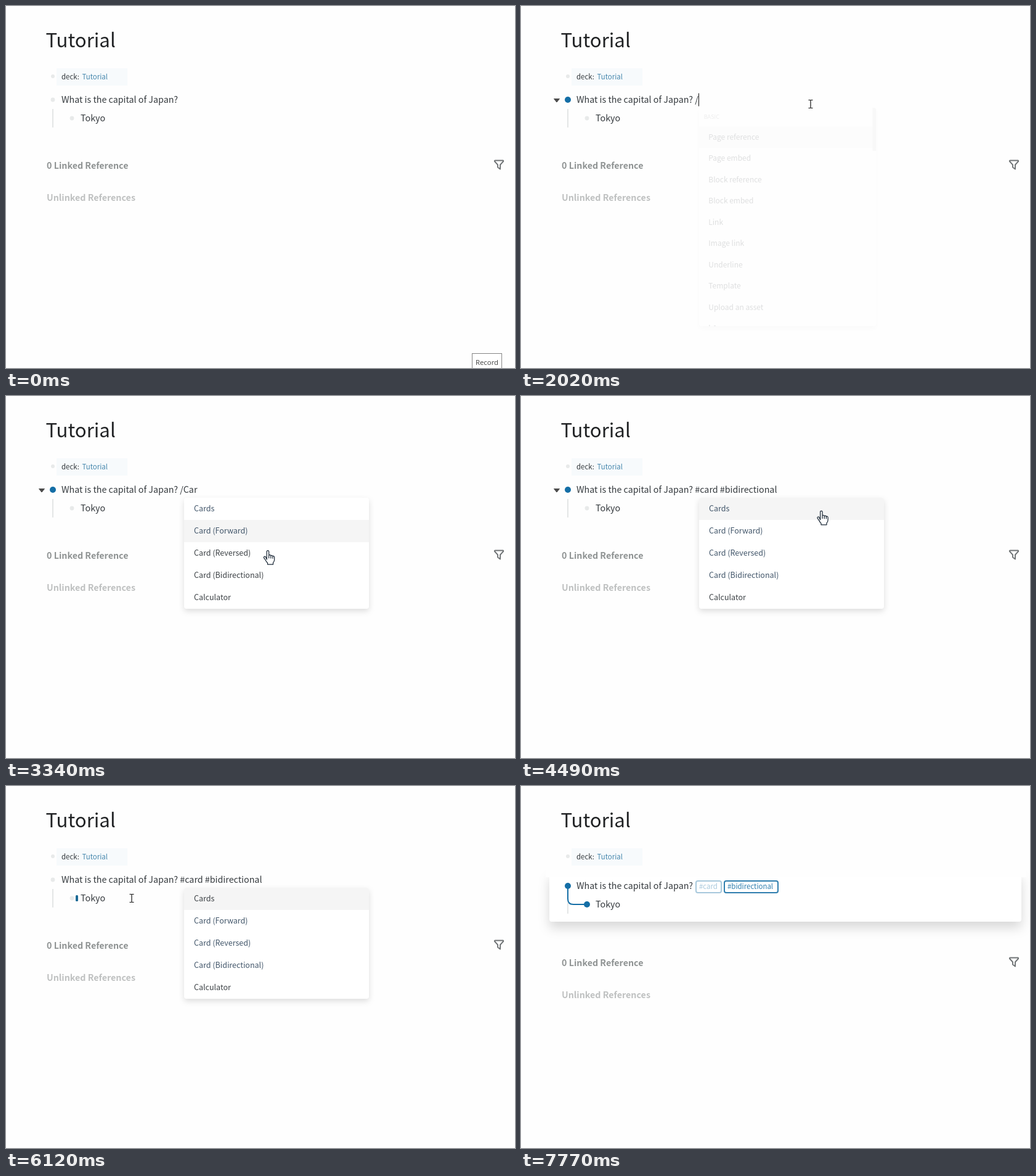
An HTML page that plays this animation: 826 px wide and 587 px high, repeating every 8 s.

```html
<!DOCTYPE html>
<html lang="en">
<head>
<meta charset="utf-8">
<title>Tutorial</title>
<style>
html, body { margin: 0; width: 100%; height: 100%; overflow: hidden; background: #fefefe; }
svg { display: block; width: 826px; height: 587px; }
text { font-family: "Noto Sans CJK JP", "Noto Sans CJK SC", "Open Sans", sans-serif; font-size: 14.29px; fill: #353a3e; white-space: pre; }
.title { font-size: 31.2px; font-weight: 300; fill: #202224; }
.small { font-size: 11.43px; }
.item { font-size: 12.5px; fill: #3c4145; }
.seen { fill: #42566a; }
.head { font-size: 9.5px; fill: #999; }
.ref { font-weight: 700; }
.tag { font-size: 11.43px; font-weight: 500; }
.tip { font: 11.4px "Open Sans", sans-serif; fill: #444; }
.menu { filter: drop-shadow(0 4px 5px rgba(0, 0, 0, .13)); }
.panel { filter: drop-shadow(0 10px 9px rgba(0, 0, 0, .15)); }
</style>
</head>
<body>
<svg viewBox="0 0 826 587">
  <defs><clipPath id="clip"><rect width="300" height="370" rx="4"/></clipPath></defs>
  <text class="title" x="64.5" y="66.5">Tutorial</text>
  <circle cx="76" cy="114" r="3" fill="#e8eaea"/>
  <rect x="82" y="101" width="115" height="28" fill="#f7fafc"/>
  <text class="small" x="90" y="119">deck:</text>
  <text class="small" x="123.5" y="119" style="fill:#4587ad">Tutorial</text>

  <rect id="panel" class="panel" x="46" y="140" width="766" height="80" rx="4" fill="#fff"/>
  <rect id="cover" x="40" y="132" width="780" height="16" fill="#fefefe"/>
  <g id="block">
    <path id="guide" d="M76 167V197" stroke="#e4e6e6" stroke-width="2"/>
    <circle id="dot" cx="76" cy="152"/>
    <circle id="subDot" cx="107" cy="182"/>
    <path id="link" d="M76 152V173Q76 182 85 182H107" fill="none" stroke="#146ea6" stroke-width="2"/>
    <rect id="bar" x="113" y="177" width="4" height="10" rx="1.5" fill="#1c6a95"/>
    <path id="fold" d="M53.5 150.5H62.5L58 156Z" fill="#4a4a4a" stroke="#4a4a4a" stroke-linejoin="round"/>
    <text id="line" x="90" y="157.3"></text>
    <text x="121" y="187.3">Tokyo</text>
    <g id="tags">
      <g opacity=".42">
        <rect x="284" y="144" width="41" height="19" rx="3" fill="none" stroke="#2f7eae" stroke-width="2"/>
        <text class="tag" x="289" y="157" style="fill:#2f7eae">#card</text>
      </g>
      <rect x="330" y="144" width="87" height="19" rx="3" fill="none" stroke="#2f7eae" stroke-width="2"/>
      <text class="tag" x="335" y="157" style="fill:#2f7eae">#bidirectional</text>
    </g>
    <rect id="caret" width="1" height="21" fill="#111"/>
  </g>

  <g id="refs">
    <text class="ref" x="66" y="264" style="fill:#8f9393">0 Linked Reference</text>
    <text class="ref" x="66" y="316" style="fill:#bfc1c1">Unlinked References</text>
    <path transform="translate(788 245.5)" d="M5.5 5h13a1 1 0 0 1 .5 1.5L14 12v7l-4-3v-4L5 6.5A1 1 0 0 1 5.5 5" fill="none" stroke="#707476" stroke-width="1.9" stroke-linejoin="round"/>
  </g>

  <g id="menu"></g>

  <g id="tip">
    <rect x="756.5" y="563.5" width="48" height="30" fill="#fff" stroke="#858585"/>
    <text class="tip" x="780.5" y="582" text-anchor="middle">Record</text>
  </g>

  <path id="arrow" d="M0 0V16.5L3.8 13L6.3 18.7L8.8 17.6L6.4 12H11.5Z" fill="#fff" stroke="#111"/>
  <path id="beam" d="M-3.5 -6.5H-1L0 -6L1 -6.5H3.5M0 -6V6M-3.5 6.5H-1L0 6L1 6.5H3.5" fill="none" stroke="#111" stroke-width="1.2"/>
  <path id="hand" d="M-1.7 14V1.3Q-1.7 -.5 0 -.5T1.7 1.3V8Q1.9 6.4 3.4 6.6T4.9 8.4Q5.3 7.1 6.6 7.4T8 9.2Q8.3 8.2 9.4 8.4T10.7 10.2V14.5Q10.7 17.4 8.6 19.2V22H-.4V19.6Q-2.4 17.8 -4 14.6L-6.4 11.2Q-6.8 9.6 -5.5 9.2T-3.4 10.2ZM1.7 8V12.2M4.9 8.4V12.4M8 9.2V12.6" fill="#fff" stroke="#1d2a38" stroke-width="1.25" stroke-linejoin="round"/>
</svg>
<script>
const LOOP = 8000;
const el = {};
document.querySelectorAll("[id]").forEach(e => el[e.id] = e);
const show = (e, on) => e.style.display = on ? "" : "none";
const clamp = v => Math.max(0, Math.min(1, v));

const ask = "What is the capital of Japan?";
// time, text after the question, caret x
const typing = [
  [0, "", 282], [1950, " /", 288], [2330, " /C", 297], [2460, " /Ca", 305],
  [2650, " /Car", 311], [3940, " #card #bidirectional", 417], [6240, "", 161]
];
// spans in which the caret is lit
const lit = [[1090, 1620], [1950, 3180], [3680, 3750], [3940, 4470], [6240, 6730], [7240, 7770]];

const all = ["Page reference", "Page embed", "Block reference", "Block embed", "Link",
  "Image link", "Underline", "Template", "Upload an asset", "h1"];
const ca = ["Cards", "CANCELED", "Calculator", "Card (Forward)", "Card (Reversed)", "Card (Bidirectional)"];
const car = ["Cards", "Card (Forward)", "Card (Reversed)", "Card (Bidirectional)", "Calculator"];
const menus = [[1950, all, 32, 370], [2400, ca, 0, 216], [2790, car, 0, 180]];
// time, highlighted row, first and last row already passed
const hover = [[0, 0, -1, -1], [3200, 0, 0, 0], [3300, 1, 0, 1], [3400, 2, 0, 2], [3500, 3, 0, 3],
  [4290, 2, 0, 3], [4350, 1, 0, 3], [4420, 0, 0, 3], [4980, 0, 1, 3]];

// time, x, y, pointer
const path = [
  [70, 744, 584, "arrow"], [330, 610, 370, "arrow"], [600, 472, 136, "beam"], [830, 470, 127, "beam"],
  [880, 470, 127, "beam"], [1040, 470, 159, "beam"], [2790, 470, 159, "beam"], [2900, 466, 172, "hand"],
  [3200, 442, 220, "hand"], [3340, 425, 251, "hand"], [3540, 403, 273, "hand"], [3750, 399, 276, "hand"],
  [4210, 399, 276, "hand"], [4490, 487, 187, "hand"], [4600, 530, 162, "beam"], [4850, 632, 125, "beam"],
  [4980, 632, 125, "beam"], [5100, 638, 145, "beam"], [5300, 638, 145, "beam"], [5500, 540, 168, "hand"],
  [5650, 390, 190, "hand"], [5760, 282, 196, "beam"], [5950, 212, 184, "beam"], [6030, 204, 182, "beam"], [6240, 204, 182, ""]
];

const at = (table, t) => table.filter(r => r[0] <= t).pop();

function menuMarkup(t) {
  const [, rows, top, height] = at(menus, t);
  const [, active, first, last] = at(hover, t);
  const item = (s, i) => {
    const seen = rows === car && i >= first && i <= last;
    return `<text class="item${seen ? " seen" : ""}" x="16" y="${top + i * 36 + 22}">${s}</text>`;
  };
  return `<rect class="menu" width="300" height="${height}" rx="4" fill="#fff"/><g clip-path="url(#clip)">` +
    `<rect y="${top + active * 36}" width="300" height="36" fill="#f5f5f5"/>` +
    (top ? `<text class="head" x="8" y="19">BASIC</text><rect x="294" width="6" height="73" fill="#ddd"/>` : "") +
    rows.map(item).join("") + "</g>";
}

function dot(e, on) {
  e.setAttribute("r", on ? 5 : 3.4);
  e.setAttribute("fill", on ? "#146ea6" : "#e8eaea");
}

let lastMenu = "";
function draw(t) {
  const done = t >= 6240;
  const editing = t >= 1090 && t < 4980;
  const fade = clamp((t - 6200) / 300);
  show(el.tip, t < 200);

  show(el.panel, done);
  show(el.cover, done);
  el.panel.style.opacity = fade;
  el.block.setAttribute("transform", `translate(0 ${done ? 10 : 0})`);
  el.refs.setAttribute("transform", `translate(0 ${done ? 28 : 0})`);
  dot(el.dot, editing || done);
  dot(el.subDot, done);
  show(el.link, done);
  show(el.tags, done);
  show(el.bar, t >= 5960 && !done);
  show(el.fold, t >= 600 && t < 5040 || t >= 5300 && t < 5700);

  const [, typed, x] = at(typing, t);
  el.line.textContent = ask + typed;
  el.caret.setAttribute("x", x);
  el.caret.setAttribute("y", done ? 171.5 : 141.5);
  show(el.caret, lit.some(([a, b]) => t >= a && t < b));

  const open = t >= 1950 && !done;
  show(el.menu, open);
  if (open) {
    const k = clamp((t - 1990) / 200);
    const html = menuMarkup(t);
    if (html !== lastMenu) el.menu.innerHTML = lastMenu = html;
    el.menu.style.opacity = k;
    el.menu.setAttribute("transform", `translate(289 165) scale(${.95 + .05 * k})`);
  }

  const a = at(path, t);
  const b = a && path[path.indexOf(a) + 1];
  for (const n of ["arrow", "beam", "hand"]) show(el[n], a && a[3] === n);
  if (a && a[3]) {
    const k = (t - a[0]) / (b[0] - a[0]);
    el[a[3]].setAttribute("transform", `translate(${a[1] + (b[1] - a[1]) * k} ${a[2] + (b[2] - a[2]) * k})`);
  }
}

const start = performance.now();
function tick(now) {
  draw(Math.max(0, now - start) % LOOP);
  requestAnimationFrame(tick);
}
draw(0);
requestAnimationFrame(tick);
</script>
</body>
</html>
```
